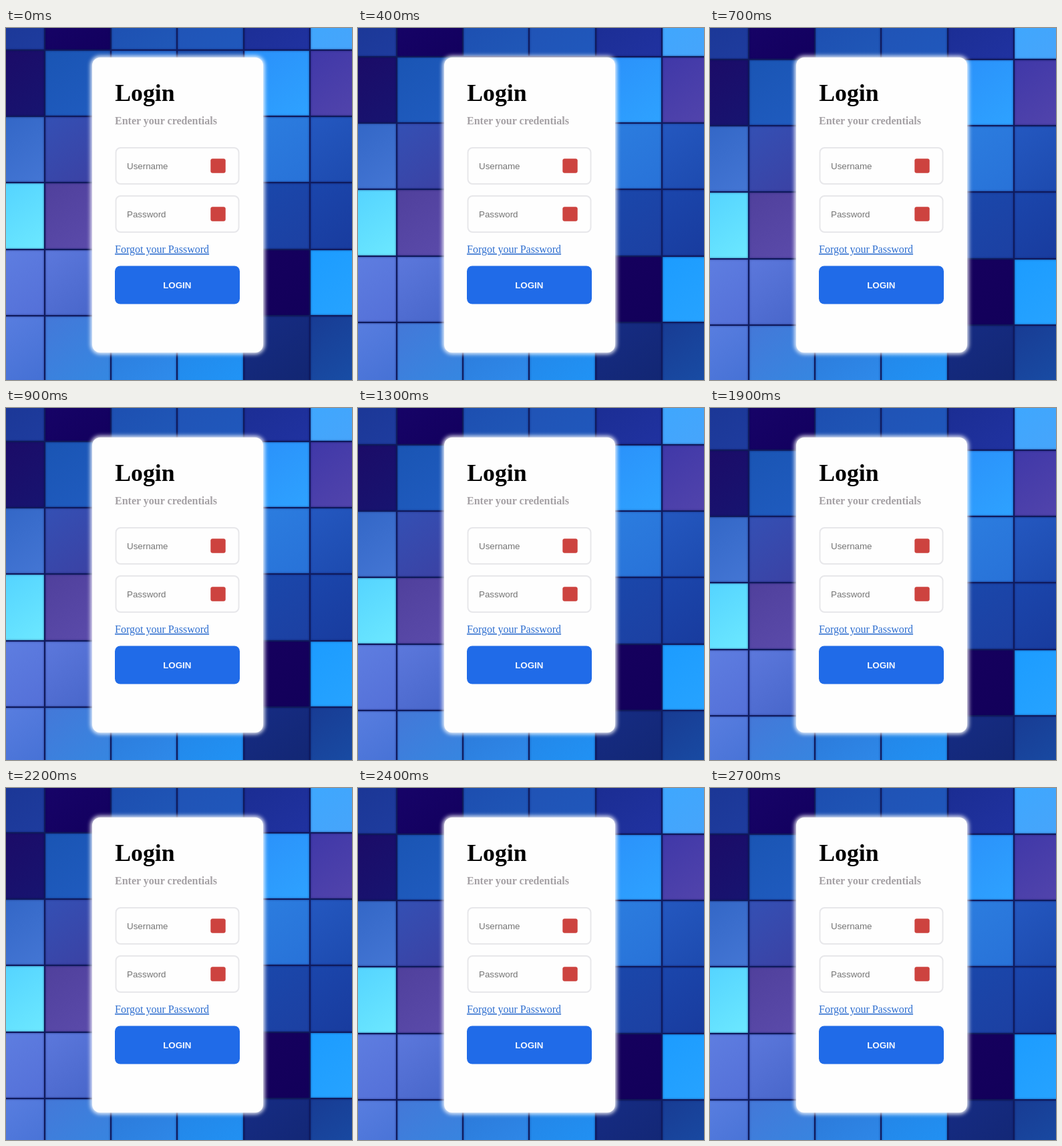
These frames come from a looping animation (518 by 526 pixels, 2.8 s). An HTML page:

```html
<!DOCTYPE html>
<html lang="en">
<head>
<meta charset="utf-8">
<title>Login</title>
<style>
  html, body { margin: 0; width: 100%; height: 100%; overflow: hidden; }
  body { position: relative; background: #0f1a5c; }
  #tiles { position: absolute; left: 0; top: 0; width: 518px; height: 526px; }
  #tiles i { position: absolute; box-shadow: inset 0 0 3px rgba(10, 16, 84, .7); }
  #card {
    position: absolute; left: 129px; top: 44px; width: 256px; height: 441px;
    border-radius: 12px; background: #fefefe; box-shadow: 0 0 6px 2px #fff;
  }
  svg { position: absolute; left: 0; top: 0; }
  .serif { font-family: "Liberation Serif", "Times New Roman", serif; font-size: 16px; }
  .sans { font-family: "Liberation Sans", Arial, sans-serif; font-size: 13.333px; }
</style>
</head>
<body>
<div id="tiles"></div>
<div id="card"></div>
<svg width="518" height="526" viewBox="0 0 518 526">
  <text class="serif" x="163.3" y="109" style="font-size:35.7px" font-weight="bold">Login</text>
  <text class="serif" x="163" y="144" font-weight="bold" fill="#a5a1a5">Enter your credentials</text>
  <g fill="#fefefe" stroke="#e7e7ea" stroke-width="2">
    <rect x="164.5" y="179" width="184" height="54" rx="7"/>
    <rect x="164.5" y="251" width="184" height="54" rx="7"/>
  </g>
  <g class="sans" fill="#757575">
    <text x="181" y="211">Username</text>
    <text x="181" y="283">Password</text>
  </g>
  <g fill="#cd433f">
    <rect x="306.3" y="195.2" width="22.4" height="21.6" rx="3"/>
    <rect x="306.3" y="267.2" width="22.4" height="21.6" rx="3"/>
  </g>
  <text class="serif" x="163" y="336" fill="#2f6fd0" text-decoration="underline">Forgot your Password</text>
  <rect x="163" y="355.5" width="187" height="57" rx="8" fill="#206be8"/>
  <text class="sans" x="256.3" y="389" font-weight="bold" text-anchor="middle" fill="#f4f8ff">LOGIN</text>
</svg>
<script>
  const PITCH = 99.2, LEFT = 58, TOP = 33, STEP = 100, LOOP = 2800;

  // Each tile: shade at its upper left, then at its lower right.
  const rows = [
    '1a3492-1e3c9e 18046a-12005e 1c4cae-2058b8 2052b4-2058bc 1a2c90-2032a0 3ca8ff-48a4fa',
    '1c0a66-171470 1a55b4-205cc0 2466cc-2a70d4 1c50b0-2460c0 2a90fa-2ea2ff 4038a8-5446ac',
    '3064c4-4476d4 3450b4-3c40a2 2c60c4-3468c8 2860c0-2c68c8 2c7ee0-2872d8 2458c0-1c48ac',
    '50d0ff-6ce8ff 50409c-5c4cac 4050b0-4858b8 2050b4-2458bc 1a48ac-1c40a2 1b46ac-183a9c',
    '6080e2-5470d8 5c78dc-4664c8 4070d0-3c74d4 2c70d0-2c78d8 16005e-12005a 1c9cff-28a4ff',
    '5c80e2-4470d4 4478d8-3488e2 2c78d8-2e8cec 2484e6-2094f6 162c84-122672 183c94-1850a8'
  ];

  const tiles = document.getElementById('tiles');
  rows.forEach((row, r) => row.split(' ').forEach((pair, c) => {
    const [a, b] = pair.split('-');
    const tile = document.createElement('i');
    const x = LEFT + (c - 1) * PITCH + 1;
    const y = TOP + (r - 1) * PITCH + 1;
    tile.style.cssText = `left:${x}px;top:${y}px;width:${PITCH - 2}px;height:${PITCH - 2}px;` +
      `background:linear-gradient(145deg,#${a},#${b})`;
    tiles.append(tile);
  }));

  // Downward drift of the wall: [ms, px].
  const drift = [[0, 0], [400, 10], [900, 17], [1300, 22], [1900, 30], [2400, 36], [2800, 36]];

  function shift(t) {
    const k = drift.findIndex(p => p[0] > t);
    const [t0, y0] = drift[k - 1], [t1, y1] = drift[k];
    return Math.round(y0 + (y1 - y0) * (t - t0) / (t1 - t0));
  }

  const frames = [];
  for (let t = 0; t < LOOP; t += STEP) {
    frames.push({ offset: t / LOOP, transform: `translateY(${shift(t)}px)`, easing: 'steps(1, end)' });
  }
  frames.push({ offset: 1, transform: `translateY(${shift(LOOP - STEP)}px)` });
  tiles.animate(frames, { duration: LOOP, iterations: Infinity });
</script>
</body>
</html>
```
